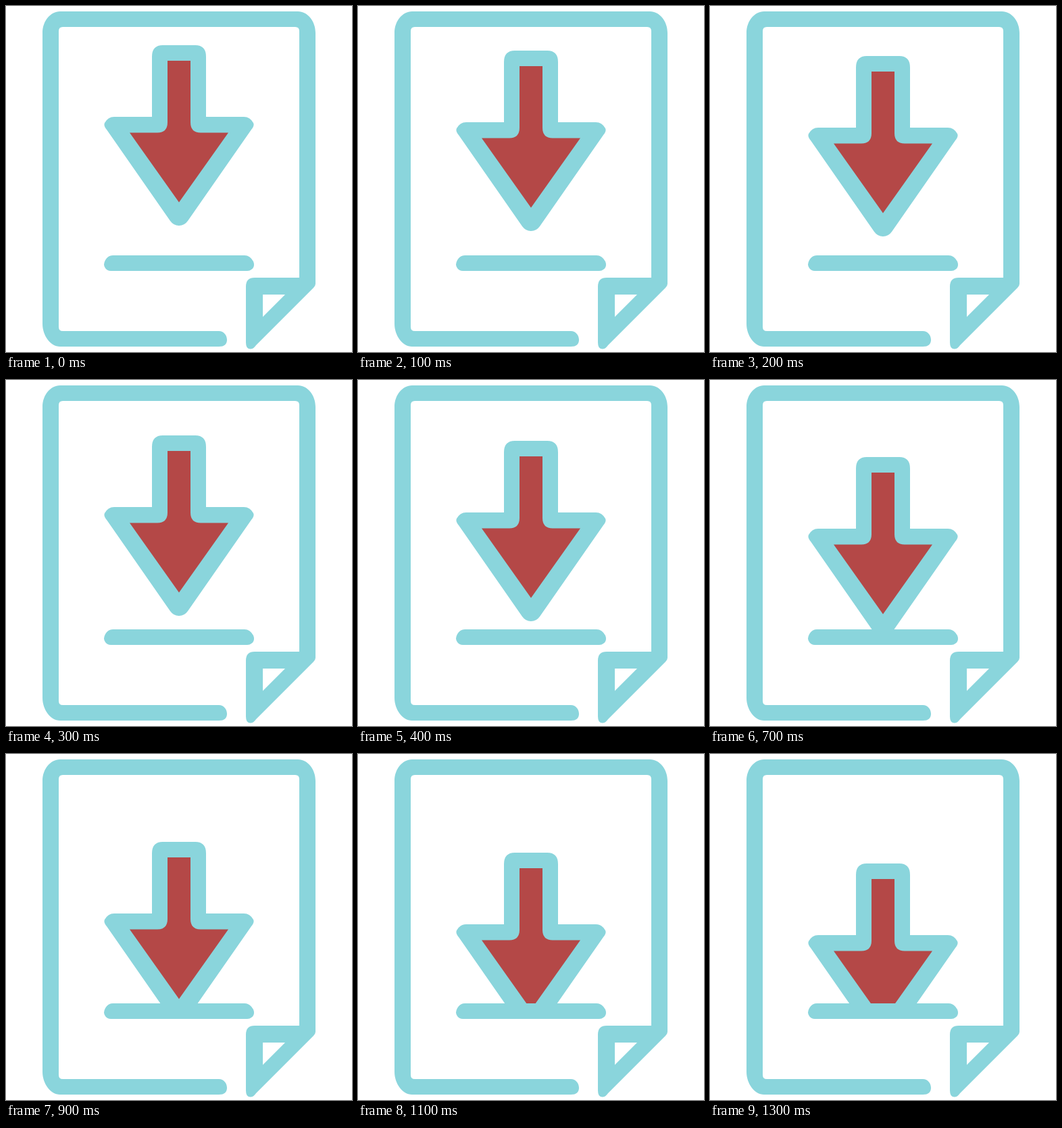
Write an HTML page that moves like this. It is 512 px wide and 512 px high and loops after 1500 ms.

```html
<!DOCTYPE html>
<html>
<head>
<meta charset="utf-8">
<style>
  html, body { margin: 0; height: 100%; overflow: hidden; background: #fff; }
  svg { display: block; width: 100%; height: 100%; }
</style>
</head>
<body>
<svg viewBox="0 0 512 512" fill="#8ad5dc">
  <clipPath id="above"><path d="M0 0H512V369.5H0Z"/></clipPath>

  <!-- page border -->
  <path d="M80 8H432C446 8 458 22 458 40V411Q458 414 455 417L370 502Q366 508 361 507.500Q355 507 355 498V415Q355 402 368 402H434V37Q434 31 428 31H84Q78 31 78 37V475Q78 481 84 481H315C322 481 327 487 327 494Q327 504 315 504H80C66 504 54 488 54 470V40C54 22 66 8 80 8Z"/>
  <path fill="#fff" d="M380 427H413L380 460Z"/>

  <g clip-path="url(#above)">
    <g id="arrow">
      <path d="M232 58H280Q296 58 296 75V164H352Q361 164 366 173Q368 177 363 183L269 318Q264 325 256 325Q248 325 243 318L149 183Q144 177 146 173Q151 164 160 164H216V75Q216 58 232 58Z"/>
      <path fill="#b44847" d="M239 81H273V172Q273 187.500 288 187.500H329L256 290.500L183 187.500H224Q239 187.500 239 172Z"/>
    </g>
  </g>

  <!-- tray line -->
  <path d="M158 369H353Q361 369 366 378Q369 386 363 390Q361 392 357 392H155Q150 392 147 388Q143 383 147 376Q151 369 158 369Z"/>
</svg>
<script>
  const arrow = document.getElementById("arrow");
  const start = performance.now();

  function draw(now) {
    const time = Math.max(0, now - start) % 1500;
    const step = Math.min(13, Math.floor(time / 100));
    arrow.setAttribute("transform", `translate(0 ${step * 8})`);
    requestAnimationFrame(draw);
  }
  draw(start);
</script>
</body>
</html>
```
